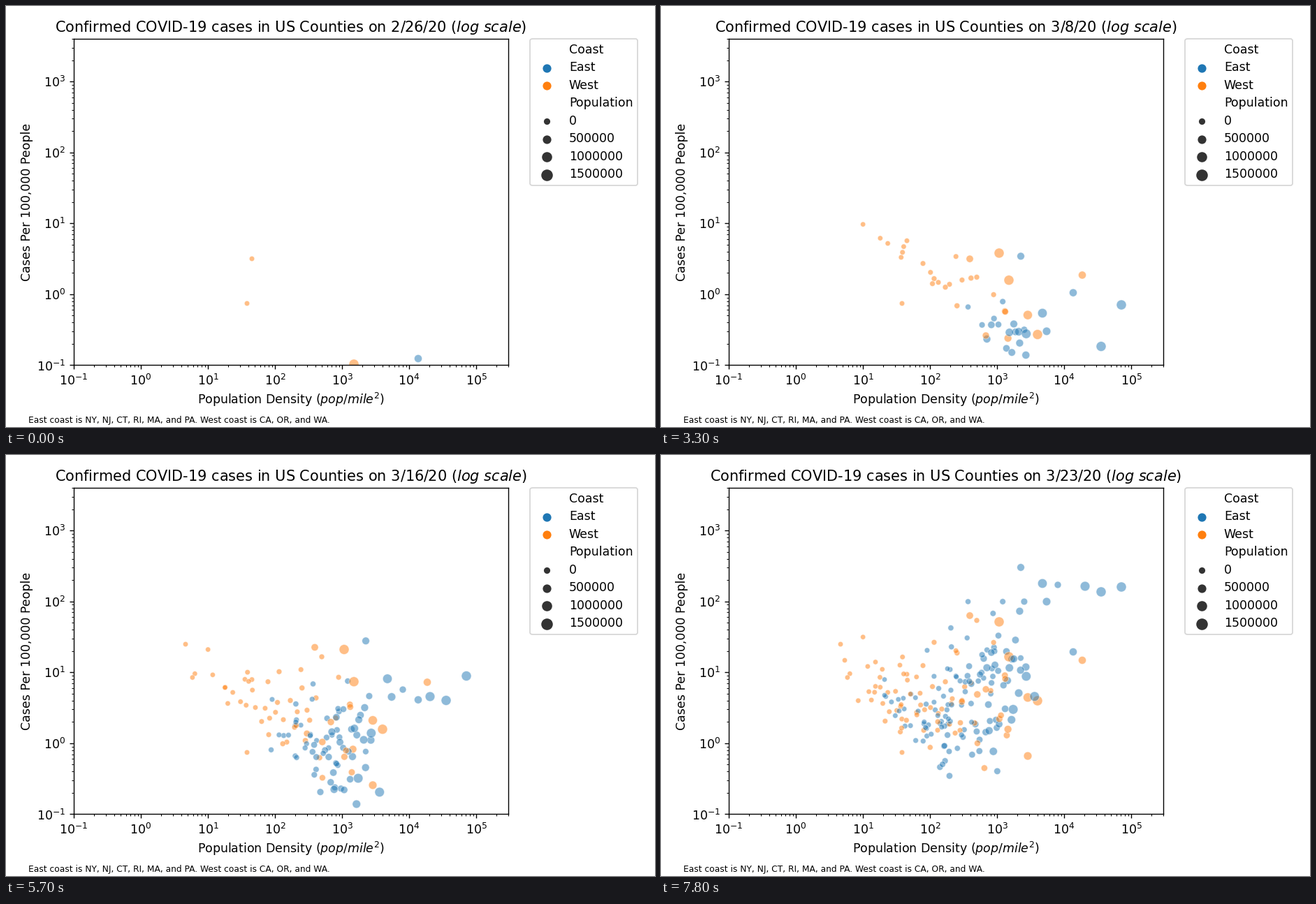
A matplotlib script that plays this animation: 929 by 603 pixels, repeating every 8 s.

```python
import matplotlib.pyplot as plt
import numpy as np
from matplotlib.animation import FuncAnimation

WIDTH, HEIGHT, DPI = 929, 603, 125.4
LEFT, TOP, PLOT_W, PLOT_H = 97, 47, 622, 467.5
BOTTOM = HEIGHT - TOP - PLOT_H
XLIM, YLIM = (0.1, 3e5), (0.1, 4000)
LAST_DAY = 26
STEP_MS, STEPS_PER_DAY, STEPS = 100, 3, 80
EAST, WEST = "tab:blue", "tab:orange"

# Landmark counties: x on stage, thousands of people, first day, first and last height.
EAST_LANDMARKS = [
    (590, 800, 0, 505, 282),
    (515, 700, 7, 411, 161),
    (505, 700, 7, 499, 292),
    (546, 1400, 10, 457, 184),
    (659, 1600, 10, 444, 189),
    (630, 1600, 10, 507, 196),
    (607, 1500, 14, 425, 188),
    (568, 500, 14, 411, 186),
]
WEST_LANDMARKS = [
    (352, 40, 0, 362, 314),
    (345, 40, 0, 426, 426),
    (498, 1600, 0, 513, 289),
    (484, 1600, 7, 399, 239),
    (442, 600, 7, 414, 230),
    (539, 1600, 7, 517, 352),
    (603, 800, 8, 412, 294),
    (257, 30, 17, 271, 271),
]


def first_case_height(people):
    """Stage height of a single case among this many thousand people."""
    return 413 + 101.6 * np.log10(people / 100)


def seeded_counties(rng, days, xs, growth):
    """Denser counties hold more people and climb faster."""
    for day, x in zip(days, xs):
        people = min(10 ** (1.55 + (x - 330) / 136 + rng.normal(0, .22)), 1600)
        first = min(first_case_height(people), 500)
        speed = max(growth(x) + rng.normal(0, 2.5), 0)
        last = max(first - speed * min(LAST_DAY - day, 15), 210)
        yield x, people, day, first, last


def build_counties():
    rng = np.random.default_rng(7)
    u_east, u_west = np.linspace(0, 1, 125), np.linspace(0, 1, 76)
    east = EAST_LANDMARKS + list(seeded_counties(
        rng, np.round(7 + 19 * u_east ** .71),
        np.clip(rng.normal(512 - 145 * u_east, 40), 320, 552),
        lambda x: 5 + .06 * (x - 330)))
    west = WEST_LANDMARKS + list(seeded_counties(
        rng, np.round(5 + 21 * u_west),
        np.clip(rng.normal(430 - 75 * u_west, 68), 255, 525),
        lambda x: 2.5 + .04 * (x - 330)))
    table = np.array(east + west, dtype=float)
    is_east = np.arange(len(table)) < len(east)
    order = rng.permutation(len(table))
    return table[order].T, is_east[order]


def to_data(pixel, start, length, limits):
    low, high = np.log10(limits)
    return 10 ** (low + (pixel - start) / length * (high - low))


def heights_on(day):
    span = np.maximum(LAST_DAY - first_days, 1)
    steady = np.clip((day - first_days) / span, 0, 1)
    # The east stalls, then surges as testing opens; the west slows down.
    surge_day = np.interp(day, [0, 15, 19, 22, 26], [0, 15, 18, 22.8, 26])
    surge = np.clip((surge_day - first_days) / span, 0, 1)
    progress = np.where(is_east, surge, 1 - (1 - steady) ** 1.4)
    heights = first_heights + (last_heights - first_heights) * progress
    return np.where(day >= first_days, heights, np.nan)


def title_for(day):
    date = f"2/{26 + day}/20" if day < 4 else f"3/{day - 3}/20"
    return rf"Confirmed COVID-19 cases in US Counties on {date} ($log\ scale$)"


def draw_legend():
    def dot(color, area=36):
        return ax.scatter([], [], s=area, color=color)

    blank = plt.Line2D([], [], linestyle="none")
    entries = [(blank, "Coast"), (dot(EAST), "East"), (dot(WEST), "West"),
               (blank, "Population")]
    entries += [(dot(".2", 18 + 18 * n), str(n * 500000)) for n in range(4)]
    ax.legend(*zip(*entries), bbox_to_anchor=(1.05, 1), loc="upper left",
              borderaxespad=0, labelspacing=.43)


plt.rcParams["font.family"] = "DejaVu Sans"
plt.rcParams["axes.labelpad"] = 2.8
# The small surplus keeps float rounding from losing a pixel.
fig = plt.figure(figsize=((WIDTH + .01) / DPI, (HEIGHT + .01) / DPI), dpi=DPI)
ax = fig.add_axes((LEFT / WIDTH, BOTTOM / HEIGHT, PLOT_W / WIDTH, PLOT_H / HEIGHT))
ax.set(xscale="log", yscale="log", xlabel="Population Density ($pop/mile^2$)",
       ylabel="Cases Per 100,000 People")

(stage_x, people, first_days, first_heights, last_heights), is_east = build_counties()
xs = to_data(stage_x, LEFT, PLOT_W, XLIM)
dots = ax.scatter(xs, np.ones_like(xs), s=17 + 48 * people / 1600,
                  c=np.where(is_east, EAST, WEST), alpha=.5,
                  edgecolors="white", linewidths=.5)
draw_legend()
ax.set(xlim=XLIM, ylim=YLIM)
title = ax.set_title(title_for(0))
fig.text(32 / WIDTH, 6 / HEIGHT,
         "East coast is NY, NJ, CT, RI, MA, and PA. West coast is CA, OR, and WA.",
         fontsize=7)


def update(step):
    day = step // STEPS_PER_DAY
    ys = to_data(HEIGHT - heights_on(day), BOTTOM, PLOT_H, YLIM)
    dots.set_offsets(np.column_stack([xs, ys]))
    title.set_text(title_for(day))
    return dots, title


anim = FuncAnimation(fig, update, frames=STEPS, interval=STEP_MS, repeat=True,
                     repeat_delay=0, blit=False)
plt.show()
```
